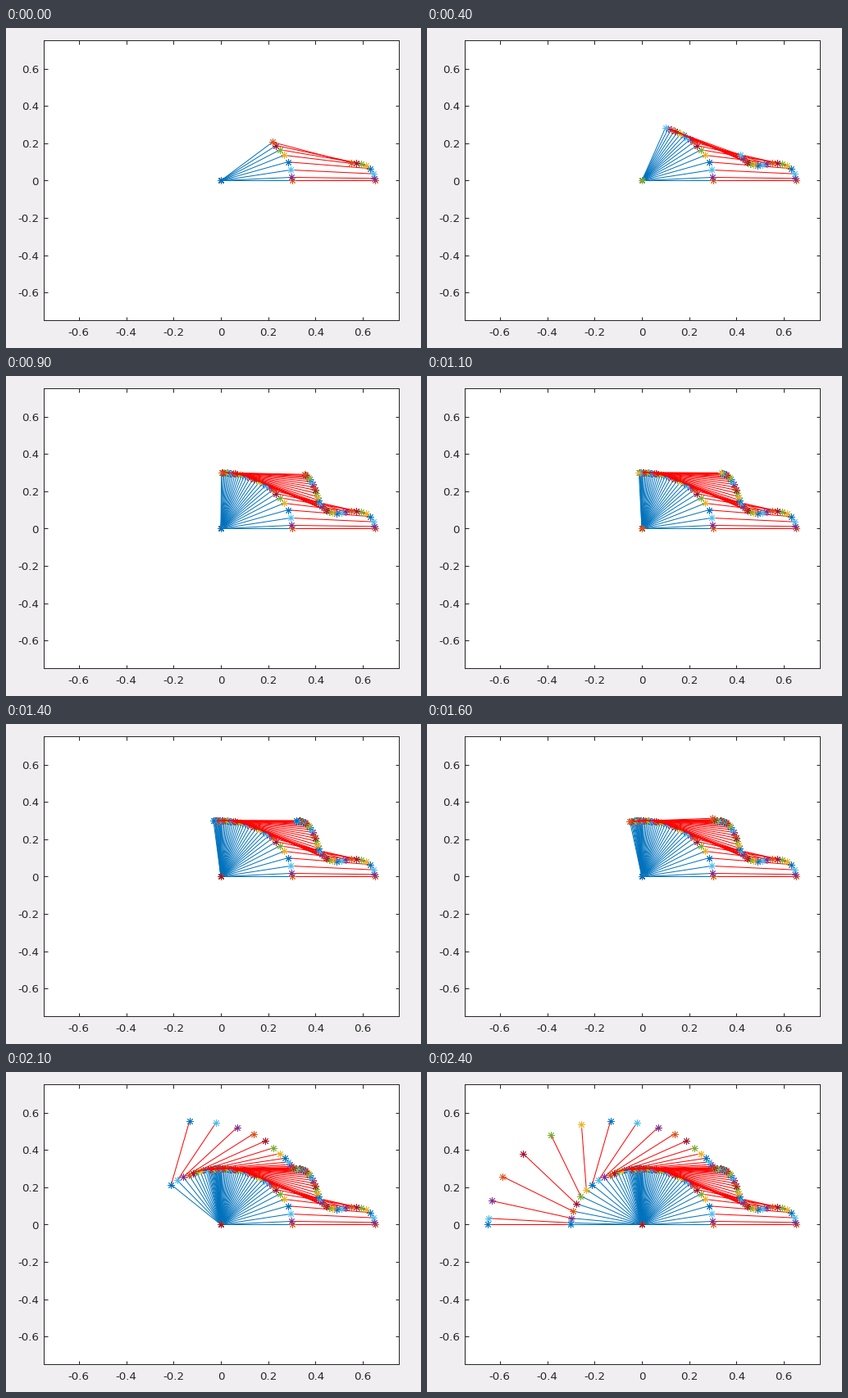
Animation, 506 px wide and 391 px high, one loop 3800 ms. Source, as a matplotlib script:

```python
import numpy as np
import matplotlib.pyplot as plt
from matplotlib.animation import FuncAnimation

W, H, DPI = 506, 391, 100
PX = 72 / DPI                      # one pixel in points
STEP_MS, FRAMES = 100, 38
L1, L2 = 0.30, 0.35
INK = "#262626"
CYCLE = ["#0072bd", "#d95319", "#edb120", "#7e2f8e",
         "#77ac30", "#4dbeee", "#a2142f"]

# pose number, angle of the first link, absolute angle of the second link
KNOTS = np.array([
    (0, 0, 0), (1, 3.4, -1), (2, 11, -3.4), (3, 19.5, -5.8), (4, 27, -8.8),
    (5, 33.5, -12.2), (6, 38.8, -15.3), (7, 43.4, -18.4), (8, 47.3, -22),
    (10, 53.8, -27), (12, 59.9, -29), (14, 65.6, -27.8), (16, 70.6, -24.8),
    (20, 78.5, -14.5), (24, 84.8, -5.8), (28, 89.6, -1.5), (33, 93, 0),
    (38, 96, 0), (42, 99.7, 2.8), (44, 102.3, 7), (45, 104.4, 10.7),
    (47, 110, 21.8), (49, 117, 38.7), (51, 127.8, 62.2), (52, 134.4, 77.2),
    (53, 141.4, 93.4), (54, 149.4, 111), (55, 158, 129.8), (56, 166.1, 148),
    (57, 173.4, 164.5), (58, 178.2, 176), (59, 180, 180)])
POSES = 60


def smooth(x, xs, ys):
    """Cubic Hermite curve through the knots."""
    slope = np.gradient(ys, xs)
    i = np.clip(np.searchsorted(xs, x, side="right") - 1, 0, len(xs) - 2)
    h = xs[i + 1] - xs[i]
    t = (x - xs[i]) / h
    return (ys[i] * (1 + 2 * t) * (1 - t) ** 2
            + slope[i] * h * t * (1 - t) ** 2
            + ys[i + 1] * t * t * (3 - 2 * t)
            + slope[i + 1] * h * t * t * (t - 1))


def polar(r, deg):
    a = np.radians(deg)
    return r * np.array([np.cos(a), np.sin(a)])


# the small extra keeps rounding from losing a pixel
fig = plt.figure(figsize=((W + 0.01) / DPI, (H + 0.01) / DPI), dpi=DPI,
                 facecolor="#f0eef0")
left, right, top, bottom = 45.5, 478.5, 15.5, 357.5
ax = fig.add_axes([left / W, 1 - bottom / H,
                   (right - left) / W, (bottom - top) / H])
ax.set(xlim=(-0.75, 0.75), ylim=(-0.75, 0.75))
ticks = np.arange(-3, 4) * 0.2
labels = ["0" if abs(v) < 0.01 else f"{v:.1f}" for v in ticks]
ax.set_xticks(ticks, labels)
ax.set_yticks(ticks, labels)
ax.tick_params(direction="in", top=True, right=True, length=4.5 * PX,
               width=PX, color=INK, labelcolor=INK, labelsize=13.33 * PX)
ax.tick_params(axis="x", pad=8.5 * PX)
ax.tick_params(axis="y", pad=5.5 * PX)
for label in ax.get_xticklabels() + ax.get_yticklabels():
    label.set_fontfamily("DejaVu Sans")
for spine in ax.spines.values():
    spine.set(color=INK, linewidth=PX)


def link(a, b, color, z):
    return ax.plot([a[0], b[0]], [a[1], b[1]], color=color, lw=PX, zorder=z)[0]


def stars(points, color, z):
    x, y = np.transpose(points)
    return ax.plot(x, y, ls="none", marker=(8, 2, 0), ms=8.4 * PX,
                   mew=0.9 * PX, mec=color, zorder=z)[0]


def make_pose(k, theta, phi):
    base = np.zeros(2)
    elbow = polar(L1, theta)
    tip = elbow + polar(L2, phi)
    z = 2 + k * 0.005
    return [link(base, elbow, CYCLE[0], z),
            link(elbow, tip, "#ff0000", z + 0.001),
            stars([base], CYCLE[2 * k % 7], z + 0.002),
            stars([elbow, tip], CYCLE[(2 * k + 1) % 7], z + 0.003)]


ks = np.arange(POSES)
thetas, phis = (smooth(ks, KNOTS[:, 0], KNOTS[:, c]) for c in (1, 2))
arms = [make_pose(*p) for p in zip(ks, thetas, phis)]


def newest_pose(frame):
    return round(np.interp(frame, [0, 4, 9, 14, 18, 21, 24],
                           [7, 16, 28, 38, 47, 52, 59]))


def draw(frame):
    last = newest_pose(frame)
    for k, arm in enumerate(arms):
        for part in arm:
            part.set_visible(k <= last)
    return []


anim = FuncAnimation(fig, draw, frames=FRAMES, interval=STEP_MS,
                     init_func=lambda: draw(0), repeat=True, repeat_delay=0,
                     blit=False)
plt.show()
```
